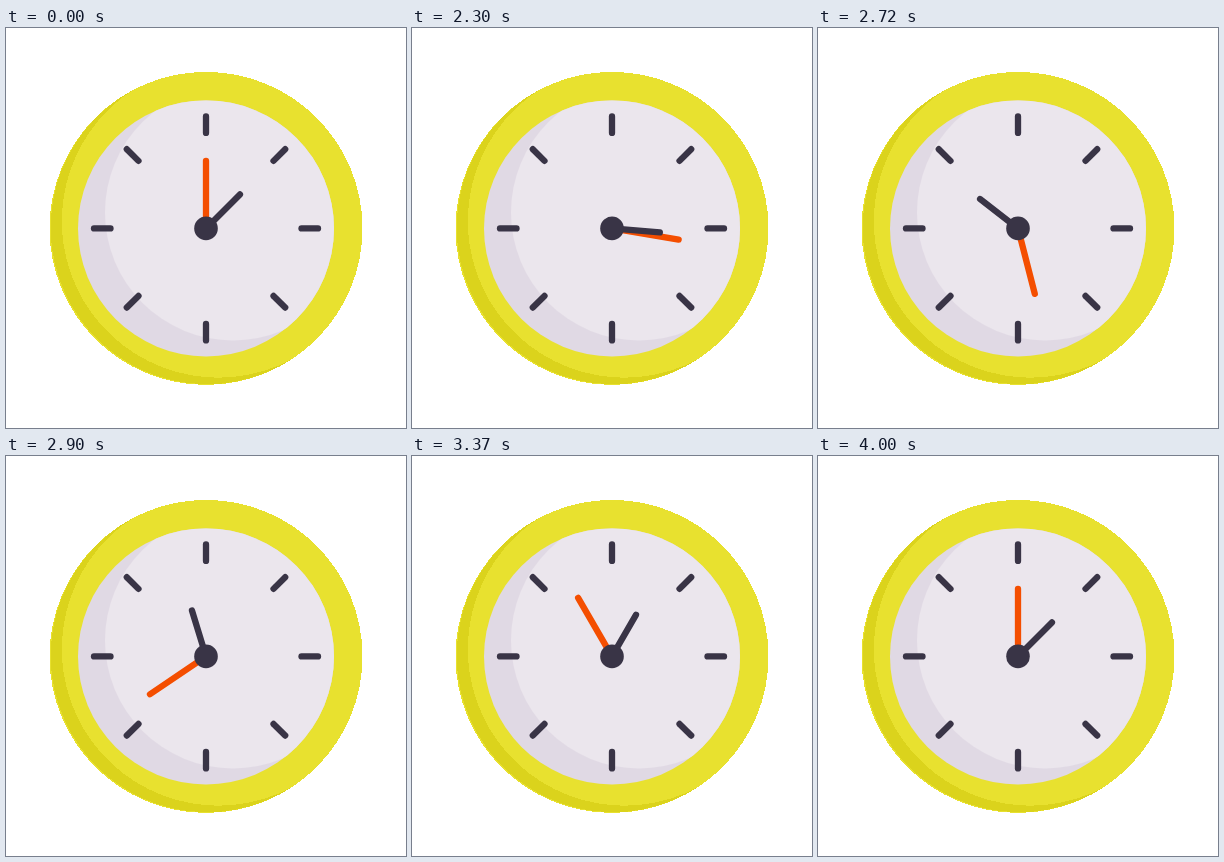
These frames come from a looping animation (400x400 px, 4.02 s). An HTML page:

```html
<!DOCTYPE html>
<html lang="en">
<head>
<meta charset="utf-8">
<title>Clock</title>
<style>
  html, body { margin: 0; width: 100%; height: 100%; overflow: hidden; background: #fff; }
  svg { display: block; width: 100%; height: 100%; }
</style>
</head>
<body>
<svg viewBox="0 0 400 400">
  <clipPath id="face"><circle r="128"/></clipPath>
  <g transform="translate(200 200.4)" stroke-width="6.3" stroke-linecap="round">
    <g shape-rendering="crispEdges">
      <circle r="156.5" fill="#e8e12f"/>
      <path fill="#dbd31c" d="M-73-138.5A156.5 156.5 0 1 0 86.5 130.5A156.5 156.5 0 0 1-73-138.5"/>
    </g>
    <circle r="128" fill="#e0d9e4"/>
    <circle cx="27" cy="-16" r="128" fill="#ebe6ed" clip-path="url(#face)"/>
    <g id="ticks" stroke="#393446"></g>
    <path id="minute" d="M0 0V-67.6" stroke="#f44e00"/>
    <path id="hour" d="M0 0V-48" stroke="#393446"/>
    <circle r="11.8" fill="#393446"/>
  </g>
</svg>
<script>
  const LOOP = 4020, STEP = 25, START = 2000, SPIN = 2000;
  const el = id => document.getElementById(id);
  const turn = (id, deg) => el(id).setAttribute('transform', `rotate(${deg})`);

  el('ticks').innerHTML = Array.from({ length: 8 }, (_, i) =>
    `<path d="M0-95.5V-112" transform="rotate(${i * 45})"/>`).join('');

  // cubic-bezier(1/3, 0, 0, 1), solved by bisection
  function ease(x) {
    if (x <= 0) return 0;
    if (x >= 1) return 1;
    let lo = 0, hi = 1;
    for (let i = 0; i < 30; i++) {
      const s = (lo + hi) / 2;
      if ((1 - s) ** 2 * s + s ** 3 < x) lo = s; else hi = s;
    }
    return lo * lo * (3 - 2 * lo);
  }

  // Poses advance 40 times a second, on 10 ms boundaries
  function draw(now) {
    const t = Math.floor(now % LOOP / 10) * 10 + 5;
    const p = ease((Math.floor(t / STEP) * STEP - START) / SPIN);
    turn('minute', 720 * p);
    turn('hour', 45 + 360 * p);
  }

  function tick() {
    draw(performance.now());
    requestAnimationFrame(tick);
  }
  tick();
</script>
</body>
</html>
```
